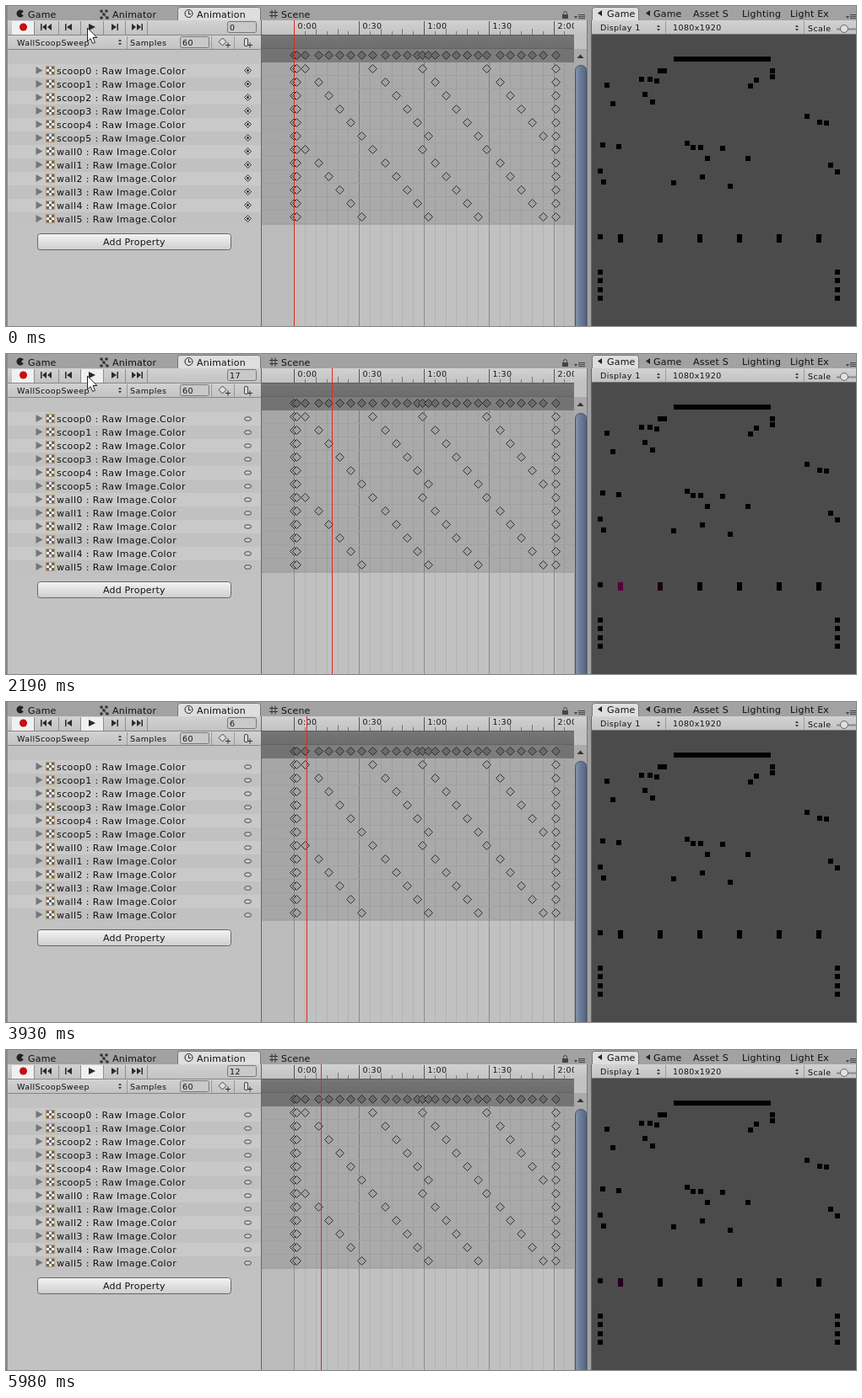
These frames come from a looping animation (1007x380 px, 6.08 s). An HTML page with a canvas:

```html
<!DOCTYPE html>
<html lang="en">
<head>
<meta charset="utf-8">
<title>Animation timeline</title>
<style>
  html, body { margin: 0; width: 100%; height: 100%; overflow: hidden; background: #a2a2a2; }
  canvas { display: block; }
</style>
</head>
<body>
<canvas id="stage" width="1007" height="380"></canvas>
<script>
const ctx = document.getElementById('stage').getContext('2d');
const LOOP = 6080, START = 760, LENGTH = 121;
const keyOffsets = [0, 31, 54, 84];
const firstKeys = [5, 11, 16, 21, 26, 31];
const rowKeys = firstKeys.map(k => [0, 1, ...keyOffsets.map(o => k + o), LENGTH]);
const allKeys = [...new Set(rowKeys.flat())].sort((a, b) => a - b);
// Time in ms against continuously counted playback position.
const pace = [[760, 48], [1610, 101], [2190, 138.3], [3030, 191.9],
              [3930, 247.7], [4690, 293.8], [5980, 375.3], [6080, 382]];
const dots = [
  [712, 94], [719, 116], [753, 87], [757, 105], [763, 87], [766, 114], [771, 89], [775, 77], [780, 77],
  [908, 77], [908, 84], [889, 88], [882, 95], [949, 131], [964, 138], [972, 139], [977, 189], [985, 197],
  [707, 165], [726, 167], [704, 196], [708, 209], [807, 163], [814, 168], [823, 168], [831, 181],
  [849, 169], [879, 181], [825, 203], [791, 210], [858, 214], [704, 274]];

const frameX = f => Math.floor(341.97 + f * 2.56) + .5;
const clamp = v => Math.max(0, Math.min(1, v));
const smooth = v => (v = clamp(v), v * v * (3 - 2 * v));

function rect(x, y, w, h, fill) {
  ctx.fillStyle = fill;
  ctx.fillRect(x, y, w, h);
}
function fade(y, h, top, bottom) {
  const g = ctx.createLinearGradient(0, y, 0, y + h);
  g.addColorStop(0, top);
  g.addColorStop(1, bottom);
  return g;
}
function line(x1, y1, x2, y2, color, width = 1) {
  ctx.strokeStyle = color;
  ctx.lineWidth = width;
  ctx.beginPath();
  ctx.moveTo(x1, y1);
  ctx.lineTo(x2, y2);
  ctx.stroke();
}
function paint(fill, stroke) {
  if (fill) { ctx.fillStyle = fill; ctx.fill(); }
  if (stroke) { ctx.strokeStyle = stroke; ctx.lineWidth = 1; ctx.stroke(); }
}
function poly(points, fill, stroke) {
  ctx.beginPath();
  points.forEach(([x, y]) => ctx.lineTo(x, y));
  ctx.closePath();
  paint(fill, stroke);
}
function oval(x, y, rx, ry, fill, stroke) {
  ctx.beginPath();
  ctx.ellipse(x, y, rx, ry, 0, 0, 2 * Math.PI);
  paint(fill, stroke);
}
function box(x, y, w, h, r, fill, stroke) {
  ctx.beginPath();
  ctx.roundRect(x, y, w, h, r);
  paint(fill, stroke);
}
function text(s, x, y, size = 11, spacing = 0.2) {
  ctx.font = size + 'px "DejaVu Sans", sans-serif';
  ctx.letterSpacing = spacing + 'px';
  ctx.fillStyle = '#111';
  ctx.fillText(s, x, y);
}
const small = (s, x, y) => text(s, x, y, 9.5, 0.4);
const diamond = (x, y, r, fill, stroke) =>
  poly([[x - r, y], [x, y - r], [x + r, y], [x, y + r]], fill, stroke);
const triangle = (x, y, w, h, fill) => poly([[x, y - h], [x + w, y], [x, y + h]], fill);
const toolbar = (x, y, w, h) => rect(x, y, w, h, fade(y, h, '#d2d2d2', '#c2c2c2'));

function gameIcon(x, y) {
  ctx.beginPath();
  ctx.moveTo(x + 1, y);
  ctx.arc(x, y, 4.5, 0.6, 5.7);
  ctx.closePath();
  paint('#222');
}
function menuIcon(x, y) {
  for (let i = 0; i < 3; i++) rect(x + 5, y - 3 + i * 2, 8, 1, '#444');
  poly([[x, y - 1], [x + 4, y - 1], [x + 2, y + 2]], '#444');
}
function imageIcon(x, y) {
  rect(x, y, 11, 11, '#b49a70');
  rect(x + 1, y + 1, 9, 9, '#f0f0f0');
  for (let c = 0; c < 9; c++)
    if (c % 2 === 0) rect(x + 1 + c % 3 * 3, y + 1 + Math.floor(c / 3) * 3, 3, 3, '#666');
}
function sorter(x, y) {
  poly([[x - 2, y - 1], [x + 2, y - 1], [x, y - 3.5]], '#333');
  poly([[x - 2, y + 1], [x + 2, y + 1], [x, y + 3.5]], '#333');
}

function drawTabs() {
  rect(0, 0, 1007, 18, '#a2a2a2');
  rect(0, 0, 2, 380, '#8a8a8a');
  box(203.5, 1.5, 98, 20, 3, '#dedede', '#777');
  gameIcon(17, 9);
  text('Game', 26, 14);
  for (const [x, y] of [[113, 6], [119, 6], [116, 10], [113, 14], [120, 14]]) oval(x, y, 1.8, 1.8, '#333');
  line(113, 6, 119, 14, '#333');
  text('Animator', 126, 14);
  oval(216.5, 9, 4.5, 4.5, null, '#222');
  line(216.5, 6, 216.5, 9.5, '#222');
  line(216.5, 9.5, 219, 9.5, '#222');
  text('Animation', 226, 14);
  for (const d of [-2, 2]) {
    line(312, 9.5 + d, 322, 9.5 + d, '#333');
    line(317 + d, 4.5, 317 + d, 14.5, '#333');
  }
  text('Scene', 326, 14);
  rect(659, 10, 7, 5, '#444');
  box(660.5, 6.5, 4, 5, 2, null, '#444');
  menuIcon(673, 13);
}

function drawToolbar(playing, frame) {
  toolbar(2, 17, 301, 18);
  toolbar(2, 35, 301, 17);
  rect(7, 18, 26, 16, '#f0f0f0');
  if (playing) rect(89, 18, 26, 16, '#f0f0f0');
  for (const x of [33, 62, 88, 115, 141, 167]) line(x + .5, 18, x + .5, 34, '#8d8d8d');
  line(2, 34.5, 302, 34.5, '#868686');
  line(2, 51.5, 302, 51.5, '#868686');
  oval(20.5, 25, 4.5, 4.5, '#c40f0f');
  const ink = '#2b2b2b';
  rect(41, 21, 1.5, 8, ink);
  triangle(48, 25, -5, 4, ink);
  triangle(54, 25, -5, 4, ink);
  rect(70, 21, 1.5, 8, ink);
  triangle(78, 25, -6, 4, ink);
  triangle(98, 25, 8, 4, ink);
  triangle(125, 25, 6, 4, ink);
  rect(131.5, 21, 1.5, 8, ink);
  triangle(149, 25, 5, 4, ink);
  triangle(155, 25, 5, 4, ink);
  rect(160.5, 21, 1.5, 8, ink);
  box(262.5, 18.5, 34, 13, 2, '#c9c9c9', '#777');
  small(String(frame), 265, 28.5);

  small('WallScoopSweep', 13, 47);
  sorter(135, 43);
  for (const x of [143, 243, 270]) line(x + .5, 36, x + .5, 51, '#999');
  small('Samples', 147, 47);
  box(206.5, 36.5, 34, 13, 2, '#c9c9c9', '#777');
  small('60', 209, 47);
  diamond(256.5, 42.5, 4.5, '#ddd', '#444');
  line(260, 46.5, 266, 46.5, '#333');
  line(263, 43.5, 263, 49.5, '#333');
  box(282.5, 38.5, 4, 9, 1.5, '#ddd', '#444');
  line(286, 46.5, 292, 46.5, '#333');
  line(289, 43.5, 289, 49.5, '#333');
}

function drawProperties(frame) {
  rect(2, 52, 300, 328, '#c2c2c2');
  for (let i = 0; i < 12; i++) {
    const y = 69 + i * 16;
    rect(2, y, 300, 16, i % 2 ? '#c1c1c1' : '#c9c9c9');
    triangle(35.5, y + 7.5, 8, 4.5, '#757575');
    imageIcon(47, y + 2);
    text((i < 6 ? 'scoop' : 'wall') + i % 6 + ' : Raw Image.Color', 60, y + 12, 11, 0.4);
    if (rowKeys[i % 6].includes(frame)) {
      diamond(286.5, y + 7.5, 4, '#c8c8c8', '#333');
      diamond(286.5, y + 7.5, 1.7, '#222');
    } else {
      oval(286.5, y + 8, 4, 2.3, '#d0d0d0', '#444');
    }
  }
  box(37.5, 270.5, 229, 19, 3, fade(270, 20, '#f4f4f4', '#cdcdcd'), '#666');
  text('Add Property', 115, 284, 11, 0.2);
}

function drawTimeline() {
  rect(303, 17, 370, 363, '#c1c1c1');
  toolbar(303, 17, 385, 17);
  rect(303, 34, 370, 17, fade(34, 17, '#767676', '#6d6d6d'));
  rect(303, 51, 370, 16, '#7d7d7d');
  rect(303, 67, 370, 193, '#aaa');
  const end = frameX(LENGTH) + .5;
  for (const [x, w] of [[303, 38], [end, 673 - end]]) {
    rect(x, 51, w, 16, 'rgba(0,0,0,.08)');
    rect(x, 67, w, 313, 'rgba(0,0,0,.025)');
  }
  ctx.save();
  ctx.beginPath();
  ctx.rect(303, 17, 370, 363);
  ctx.clip();
  for (let f = 0; f <= 125; f += 5) {
    const x = frameX(f), major = f % 30 === 0;
    line(x, 67, x, 380, major ? 'rgba(0,0,0,.27)' : 'rgba(0,0,0,.07)');
    line(x, major ? 18 : f % 10 ? 30 : 27, x, 34, major ? '#555' : '#777');
    if (major) small(`${Math.floor(f / 60)}:${f % 60 ? 30 : '00'}`, x + 4, 27);
  }
  ctx.restore();
  line(303, 34.5, 673, 34.5, '#5d5d5d');
  line(303, 50.5, 673, 50.5, '#626262');
  for (let y = 82.5; y < 260; y += 16) line(303, y, 673, y, '#a0a0a0');

  rect(673, 34, 16, 346, '#c2c2c2');
  rect(673, 51, 16, 329, '#aaa');
  poly([[676.5, 62], [684.5, 62], [680.5, 57.5]], '#333');
  const thumb = ctx.createLinearGradient(674, 0, 688, 0);
  thumb.addColorStop(0, '#8996ad');
  thumb.addColorStop(.5, '#687998');
  thumb.addColorStop(1, '#54647f');
  box(674.5, 70.5, 13, 330, 6, thumb, '#465064');
  line(302.5, 17, 302.5, 380, '#666');
}

function drawKeys() {
  for (const k of allKeys) diamond(frameX(k), 58.5, 5, '#6a6a6a', '#2c2c2c');
  for (let i = 0; i < 12; i++)
    for (const k of rowKeys[i % 6]) diamond(frameX(k), 74.5 + i * 16, 5, '#a2a2a2', '#303030');
}

function drawGame(position) {
  rect(689, 0, 5, 380, '#a2a2a2');
  line(688.5, 17, 688.5, 380, '#777');
  line(693.5, 17, 693.5, 380, '#666');
  rect(694, 0, 313, 17, '#a2a2a2');
  box(694.5, 1.5, 55, 20, 3, '#dedede', '#777');
  poly([[706, 5], [701, 8.5], [706, 12]], '#222');
  text('Game', 712, 13);
  poly([[763, 5], [758, 8.5], [763, 12]], '#222');
  text('Game', 767, 13);
  text('Asset S', 814, 13);
  text('Lighting', 872, 13);
  text('Light Ex', 929, 13);
  menuIcon(995, 13);
  toolbar(694, 17, 313, 17);
  small('Display 1', 704, 29);
  sorter(773, 26);
  small('1080x1920', 790, 29);
  sorter(937, 26);
  for (const x of [781, 945]) line(x + .5, 18, x + .5, 33, '#999');
  small('Scale', 950, 30);
  line(984, 27.5, 1007, 27.5, '#888', 2);
  oval(993, 27, 4.5, 4.5, '#e0e0e0', '#666');
  rect(694, 34, 313, 346, '#4b4b4b');
  line(694, 33.5, 1007, 33.5, '#777');

  rect(791, 60, 115, 6, '#000');
  for (const [x, y] of dots) rect(x - 3, y - 3, 6, 6, '#000');
  for (const x of [704, 985])
    for (const y of [316, 326, 337, 347]) rect(x - 3, y - 3, 6, 6, '#000');
  firstKeys.forEach((k, i) => {
    const level = smooth((position - k) / 31) - smooth((position - k - 54) / 30);
    rect(Math.round(725 + i * 46.9), 271, 6, 10, `rgb(${255 * level}, 0, ${170 * level})`);
  });
}

function drawCursor(x, y) {
  poly([[x, y], [x, y + 16], [x + 3.7, y + 12.7], [x + 6.3, y + 18.5], [x + 9, y + 17.3],
        [x + 6.5, y + 11.5], [x + 11.3, y + 11.5]], '#fff', '#222');
}

// Playback advances in steps of about 64 ms.
function playback(time) {
  if (time < START) return 0;
  const i = pace.findIndex(([t]) => t > time) - 1;
  const [t0, p0] = pace[i], [t1, p1] = pace[i + 1];
  const steps = Math.floor((t1 - t0) / 62) || 1;
  const part = Math.floor((time - t0) / (t1 - t0) * steps) / steps;
  return (p0 + (p1 - p0) * part) % LENGTH;
}

function draw(time) {
  const position = playback(time), frame = Math.round(position), x = frameX(position);
  drawTabs();
  drawToolbar(time >= START, frame);
  drawProperties(frame);
  drawTimeline();
  drawKeys();
  line(x, 17, x, 380, '#e8241c');
  drawGame(position);
  if (time < 3090) {
    const move = smooth((time - 2690) / 340);
    drawCursor(96.5 + 738.5 * move, 26 + 338 * move);
  }
}

function tick() {
  draw(performance.now() % LOOP);
  requestAnimationFrame(tick);
}
tick();
</script>
</body>
</html>
```
